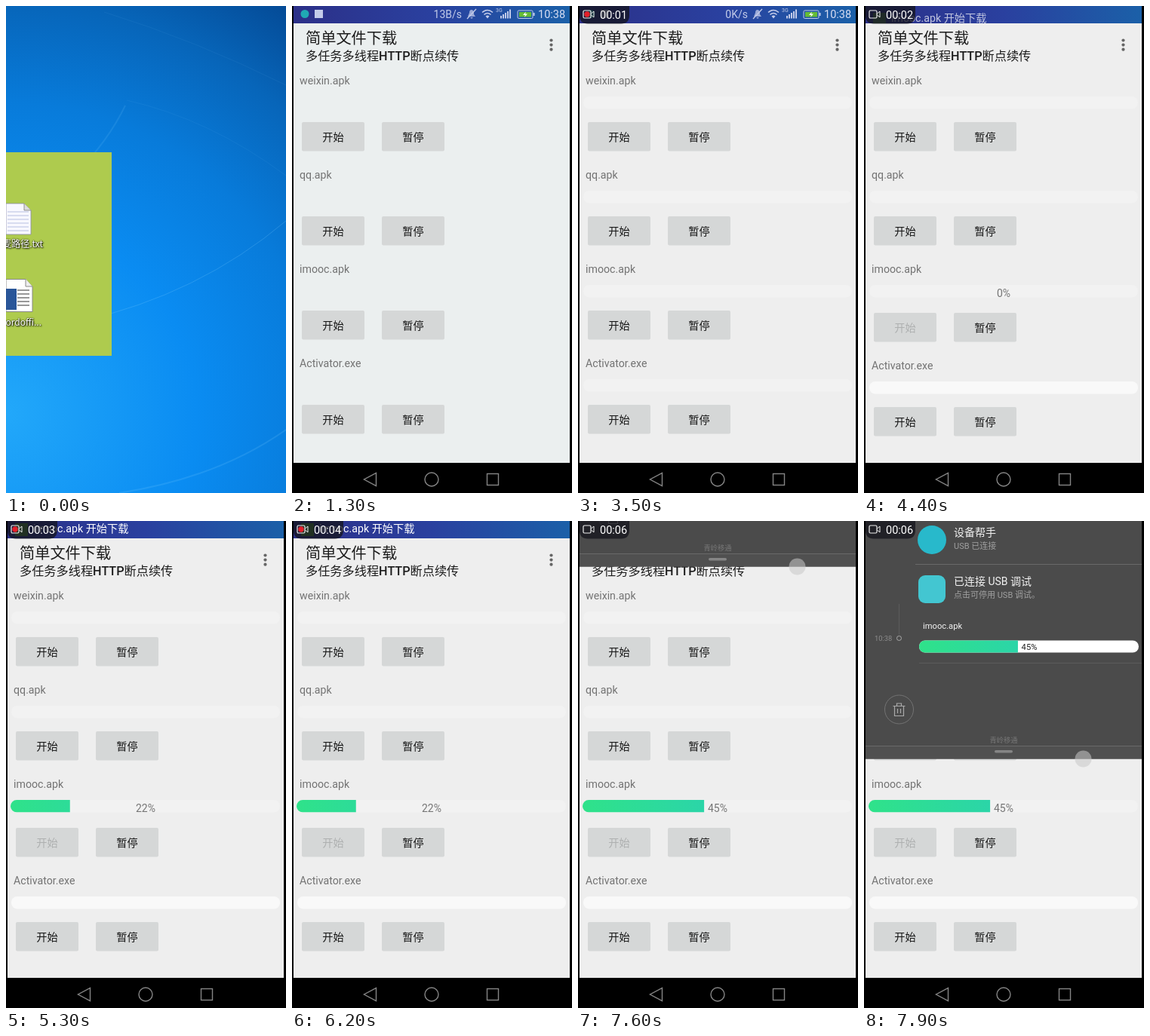
An HTML page that plays this animation: 371x646 px, repeating every 8 s.

```html
<!DOCTYPE html>
<html lang="zh-CN">
<head>
<meta charset="utf-8">
<title>文件下载</title>
<style>
html, body { margin: 0; width: 100%; height: 100%; overflow: hidden; background: #000; }
svg { display: block; width: 371px; height: 646px; }
text { font-family: Roboto, "Noto Sans CJK SC", "Noto Sans CJK", sans-serif; white-space: pre; }
.desk { font-family: "Noto Sans CJK SC", "Noto Sans CJK", sans-serif; font-size: 12px; fill: #fff;
  text-anchor: end; text-shadow: 1px 1px 2px #000, 0 0 2px #000; }
</style>
</head>
<body>
<svg viewBox="0 0 371 646">
  <defs>
    <radialGradient id="sky" gradientUnits="userSpaceOnUse" cx="0" cy="540" r="665">
      <stop offset="0" stop-color="#22a8fa"/><stop offset=".38" stop-color="#0a8cf2"/>
      <stop offset=".62" stop-color="#087bda"/><stop offset=".82" stop-color="#0765b9"/>
      <stop offset="1" stop-color="#044893"/>
    </radialGradient>
    <linearGradient id="statusFill">
      <stop offset="0" stop-color="#2c3088"/><stop offset=".5" stop-color="#2a409f"/>
      <stop offset="1" stop-color="#1b60a8"/>
    </linearGradient>
    <linearGradient id="barFill" gradientUnits="userSpaceOnUse" x1="6" x2="364">
      <stop offset="0" stop-color="#2fe28a"/><stop offset=".45" stop-color="#2bd5a8"/>
      <stop offset="1" stop-color="#25c6cc"/>
    </linearGradient>
    <linearGradient id="noticeFill" gradientUnits="userSpaceOnUse" x1="73" x2="364">
      <stop offset="0" stop-color="#2fe28a"/><stop offset=".45" stop-color="#2bd5a8"/>
      <stop offset="1" stop-color="#25c6cc"/>
    </linearGradient>
    <clipPath id="statusClip"><rect x="2" width="366" height="23"/></clipPath>
    <clipPath id="screenClip"><rect x="2" width="366" height="606"/></clipPath>
    <clipPath id="barClip"><rect x="6" y="370" width="358" height="16.5" rx="8.2"/></clipPath>
    <clipPath id="noticeClip"><rect x="73" y="158.5" width="291" height="16" rx="8"/></clipPath>
  </defs>

  <g id="desktop">
    <rect width="371" height="646" fill="url(#sky)"/>
    <g fill="none" stroke="#8fd6ff">
      <path d="M100 418Q255 383 371 285" stroke-opacity=".22"/>
      <path d="M150 646Q280 626 371 562" stroke-opacity=".15" stroke-width="2"/>
      <path d="M90 225Q135 180 158 132" stroke-opacity=".12" stroke-width="2"/>
      <path d="M130 8Q250 45 371 105M160 125Q270 150 371 225" stroke-opacity=".07"/>
    </g>
    <rect x="-130" y="194" width="270" height="270" fill="#aecb4e"/>
    <path d="M0 262H24L33 271V303H0Z" fill="#f8f8ff" stroke="#8a8aa8" stroke-width=".8"/>
    <path d="M24 262V271H33" fill="#ddd" stroke="#777" stroke-width=".8"/>
    <path d="M2 273H30M2 278H30M2 283H30M2 288H30M2 293H30M2 298H30" stroke="#b7bfe0"/>
    <text class="desk" x="49" y="320">麦路径.txt</text>
    <path d="M0 362.5H26L35 372V405.5H0Z" fill="#fff" stroke="#888"/>
    <path d="M26 362V372H35" fill="#eee" stroke="#888"/>
    <path d="M15 377H31M15 382H31M15 387H31M15 392H31M15 397H31" stroke="#777" stroke-width="1.5"/>
    <rect x="-14" y="375" width="28" height="28" fill="#2a5699"/>
    <text class="desk" x="47" y="424">wordoffi...</text>
  </g>

  <g id="phone">
    <rect width="371" height="646"/>
    <rect id="page" x="2" y="23" width="366" height="583"/>
    <text x="18" y="49.5" font-size="20.2" fill="#1c1c1c">简单文件下载</text>
    <text x="18" y="72" font-size="16.2" font-weight="500" fill="#1c1c1c">多任务多线程HTTP断点续传</text>
    <g fill="#666"><circle cx="343.5" cy="45.5" r="2.1"/><circle cx="343.5" cy="51.6" r="2.1"/><circle cx="343.5" cy="57.7" r="2.1"/></g>
    <g id="rows"></g>
    <g id="progress">
      <g clip-path="url(#barClip)"><rect id="bar" x="6" y="370" height="16.5" fill="url(#barFill)"/></g>
      <text id="percent" x="185" y="385.5" font-size="14" fill="#757575" text-anchor="middle"></text>
    </g>
    <circle id="press" cx="55" cy="424" r="11" fill="#aaa" opacity=".5"/>
    <g fill="none" stroke="#858585" stroke-width="1.4">
      <path d="M111.5 619.5V636.5L95.5 628Z"/><circle cx="185" cy="628" r="9"/><rect x="258.5" y="620.5" width="15" height="15"/>
    </g>

    <g clip-path="url(#statusClip)">
      <rect x="2" width="366" height="23" fill="url(#statusFill)"/>
      <g id="icons" fill="#c3cbe9">
        <circle cx="17" cy="10.5" r="5.5" fill="#20a9b4"/>
        <rect x="30" y="5" width="11" height="11"/>
        <text id="speed" x="225" y="16" font-size="14" text-anchor="end"></text>
        <path d="M233 14H243L241 11V8Q240 5 238 5Q235 5 235 9ZM236 15H240L238 17Z" opacity=".75"/>
        <path d="M232 17L244 4" stroke="#c3cbe9" stroke-width="1.3"/>
        <path d="M252 8.5Q259 2.5 266 8.5M254.5 11.5Q259 7.5 263.5 11.5" fill="none" stroke="#c3cbe9" stroke-width="1.6"/>
        <path d="M256.5 13.5Q259 11.5 261.5 13.5L259 16.5Z"/>
        <text x="270" y="7.5" font-size="7">3G</text>
        <path d="M276 13H278V16.5H276ZM279 11H281V16.5H279ZM282 9H284V16.5H282ZM285 7H287V16.5H285ZM288 4.5H290V16.5H288Z"/>
        <rect x="299" y="6" width="20" height="10.5" rx="1.5" fill="none" stroke="#c3cbe9"/>
        <rect x="319.5" y="9" width="2" height="4"/><rect x="301" y="8" width="16" height="6.5" fill="#65bd35"/>
        <path d="M310 7.5L306 12H309L308 15L312 10.5H309Z" fill="#fff"/>
        <text x="326" y="16" font-size="14.5" fill="#d8def3">10:38</text>
      </g>
      <g id="ticker">
        <rect x="12" y="3" width="17" height="17" fill="#4d8b35"/>
        <text x="36" y="15" font-size="14.2" fill="#fff">imooc.apk 开始下载</text>
      </g>
    </g>

    <g clip-path="url(#screenClip)"><g id="shade">
      <rect x="2" y="-400" width="366" height="715.5" fill="#4b4b4b"/>
      <rect x="2" y="298" width="366" height="17.5" fill="#505050"/>
      <path d="M68 57.5H368M2 298.5H368" stroke="#696969"/>
      <path d="M46.5 0V20M46.5 110V151M73 188.5H368" stroke="#5b5b5b"/>
      <circle cx="90" cy="25" r="19" fill="#28b9cb"/>
      <rect x="72" y="72" width="36" height="37" rx="9" fill="#43c6d1"/>
      <g fill="#f2f2f2" font-size="14"><text x="119" y="20">设备帮手</text><text x="119" y="85">已连接 USB 调试</text></g>
      <g fill="#a0a0a0" font-size="11"><text x="119" y="37">USB 已连接</text><text x="119" y="102">点击可停用 USB 调试。</text></g>
      <text x="14" y="159" font-size="9.3" fill="#8d8d8d">10:38</text>
      <circle cx="46.5" cy="155.5" r="3" fill="none" stroke="#aaa"/>
      <text x="78" y="143" font-size="11.2" fill="#f4f4f4">imooc.apk</text>
      <g clip-path="url(#noticeClip)">
        <rect x="73" y="158" width="291" height="17" fill="#fff"/>
        <rect id="noticeBar" x="73" y="158" height="17" fill="url(#noticeFill)"/>
      </g>
      <text id="noticePercent" x="219" y="171" font-size="11.2" fill="#222" text-anchor="middle"></text>
      <g fill="none" stroke="#aaa" stroke-width="1.2">
        <circle cx="46.5" cy="250" r="19" stroke="#737373" stroke-width="1"/>
        <path d="M38.5 245.5H54.5M43.5 245V242H49.5V245M40.5 246V258.5H52.5V246M44.5 249V255M48.5 249V255"/>
      </g>
      <text x="185" y="294" font-size="9.3" fill="#777" text-anchor="middle">青岭移通</text>
      <rect x="173" y="304" width="24" height="3.5" rx="1.7" fill="#858585"/>
      <circle cx="290.5" cy="315.5" r="11" fill="#c9c9c9" opacity=".55"/>
    </g></g>

    <g id="badge">
      <path d="M2 0H68V12Q68 23.5 57 23.5H13Q2 23.5 2 12Z" fill="#15151c" opacity=".76"/>
      <rect x="7" y="6" width="10" height="10" rx="1.5" fill="none" stroke="#eee" stroke-width="1.2"/>
      <path d="M17.5 10L21 7V15L17.5 12" fill="none" stroke="#eee"/>
      <circle id="recDot" cx="12" cy="11" r="3.7" fill="#e5202b"/>
      <text id="clock" x="29" y="16.5" font-size="14.5" fill="#fff"></text>
    </g>
  </g>
</svg>
<script>
const LOOP = 8000;
const FILES = ['weixin.apk', 'qq.apk', 'imooc.apk', 'Activator.exe'];
const SECOND_STARTS = [2000, 3000, 4000, 4800, 5700, 6700, 7600];
const $ = id => document.getElementById(id);
const ramp = (t, from, to) => Math.min(1, Math.max(0, (t - from) / (to - from)));
const show = (id, on) => $(id).setAttribute('display', on ? 'inline' : 'none');
const shift = (id, y) => $(id).setAttribute('transform', `translate(0 ${y})`);

const button = (x, y, label) => `
  <rect x="${x}" y="${y}" width="83" height="38.5" rx="2" fill="#d5d7d7"/>
  <text x="${x + 41.5}" y="${y + 25}" font-size="14.2" font-weight="500" fill="#161616" text-anchor="middle">${label}</text>`;

$('rows').innerHTML = FILES.map((name, i) => {
  const y = 99 + 125 * i;
  return `<g id="row${i}">
    <text x="10" y="${y + 5}" font-size="14.2" fill="#737373">${name}</text>
    <rect id="track${i}" x="7" y="${y + 21}" width="356" height="16.5" rx="8" fill="#fff"/>
    <g id="buttons${i}"><g id="start${i}">${button(13, y + 55, '开始')}</g>${button(119, y + 55, '暂停')}</g>
  </g>`;
}).join('');

function render(time) {
  const t = Math.floor(time / 100) * 100;
  const onPhone = t >= 1300;
  show('desktop', !onPhone);
  show('phone', onPhone);
  if (!onPhone) return;

  const recording = t >= 2200, started = t >= 4200;
  $('page').setAttribute('fill', recording ? '#eeeeee' : '#ebefef');
  $('speed').textContent = recording ? '0K/s' : '13B/s';

  show('badge', recording);
  const second = Math.max(0, SECOND_STARTS.findLastIndex(s => t >= s));
  $('clock').textContent = '00:0' + second;
  show('recDot', t - SECOND_STARTS[second] >= 500);

  const percent = t >= 6700 ? 45 : t >= 5300 ? 22 : 0;
  show('progress', started);
  $('bar').setAttribute('width', 3.58 * percent);
  $('noticeBar').setAttribute('width', 2.91 * percent);
  $('percent').textContent = $('noticePercent').textContent = percent + '%';
  shift('buttons2', started ? 3 : 0);
  shift('row3', started ? 3 : 0);
  $('start2').querySelector('text').setAttribute('fill', started ? '#aeb0b0' : '#161616');
  FILES.forEach((_, i) => $('track' + i).setAttribute('opacity', !recording ? 0 : i === 3 && started ? .65 : .2));
  show('press', t >= 3900 && t < 4200);

  // The ticker rises from below, then drops away as the icons return.
  const enter = ramp(t, 4300, 4500), leave = ramp(t, 6700, 7100);
  shift('ticker', 12 * (1 - enter) + 15 * leave);
  $('ticker').setAttribute('opacity', Math.sqrt(enter * (1 - leave)));
  shift('icons', enter < 1 ? -44 * enter : -34 * (1 - leave));

  show('shade', t >= 7600);
  shift('shade', -255 * (1 - ramp(t, 7600, 7900)));
}

const origin = performance.now();
function tick() {
  render((performance.now() - origin) % LOOP);
  requestAnimationFrame(tick);
}
tick();
</script>
</body>
</html>
```
